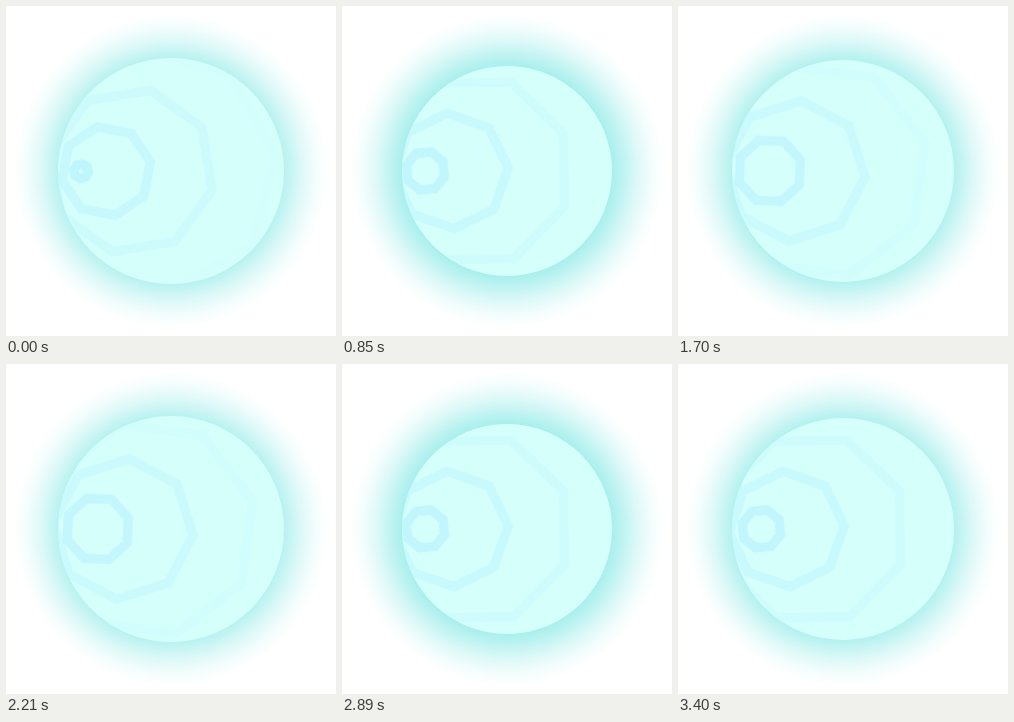
An HTML page without scripts for the animation above (3.57 s loop, 330 by 330 pixels).

```html
<!DOCTYPE html>
<html lang="en">
<head>
<meta charset="utf-8">
<title>Glowing tunnel orb</title>
<style>
  html, body { margin: 0; width: 100%; height: 100%; overflow: hidden; background: #fff; }
  svg { display: block; width: 330px; height: 330px; }
  #octagon { vector-effect: non-scaling-stroke; }

  /* --k is the depth of a ring: 0 is the far end, 9 the nearest */
  .ring {
    fill: none;
    stroke: #bff5fd;
    stroke-width: 9.5px;
    transform-box: view-box;
    transform-origin: 0 0;
    animation: recede 510ms steps(3) infinite;
  }
  .far {
    transform: translate(75px, 165.2px) rotate(8.5deg) scale(.073);
    animation: blink 510ms step-end infinite;
  }
  @keyframes recede {
    from {
      transform: translate(calc(75px + 8.4px * var(--k)), 165px)
                 rotate(calc(8.5deg + 8.3deg * var(--k)))
                 scale(calc(.073 + .126 * var(--k)));
      opacity: calc(1 - .1 * var(--k));
    }
    to {
      transform: translate(calc(75px + 8.4px * (var(--k) - 3)), 165px)
                 rotate(calc(8.5deg + 8.3deg * (var(--k) - 3)))
                 scale(calc(.073 + .126 * (var(--k) - 3)));
      opacity: calc(1 - .1 * (var(--k) - 3));
    }
  }
  @keyframes blink {
    0% { opacity: 1; }
    33.333%, 100% { opacity: 0; }
  }
</style>
</head>
<body>
<svg viewBox="0 0 330 330">
  <defs>
    <radialGradient id="glow" gradientUnits="userSpaceOnUse" cx="165" cy="165" r="157">
      <stop offset=".66" stop-color="#3ddcd6" stop-opacity=".46"/>
      <stop offset=".73" stop-color="#3ddcd6" stop-opacity=".35"/>
      <stop offset=".83" stop-color="#3ddcd6" stop-opacity=".18"/>
      <stop offset=".92" stop-color="#3ddcd6" stop-opacity=".06"/>
      <stop offset="1" stop-color="#3ddcd6" stop-opacity="0"/>
    </radialGradient>
    <clipPath id="orb">
      <circle cx="165" cy="165" r="113">
        <animate attributeName="r" dur="3570ms" repeatCount="indefinite" calcMode="discrete"
          values="113;113.4;113;111.5;108;105;104.5;105;107;109;111;113;113.4;113;110;107;105;105;106.5;109;111"/>
      </circle>
    </clipPath>
    <polygon id="octagon" points="100,0 70.71,70.71 0,100 -70.71,70.71 -100,0 -70.71,-70.71 0,-100 70.71,-70.71"/>
  </defs>
  <circle cx="165" cy="165" r="157" fill="url(#glow)"/>
  <g clip-path="url(#orb)">
    <rect width="330" height="330" fill="#d5fffb"/>
    <use class="ring" href="#octagon" style="--k:9"/>
    <use class="ring" href="#octagon" style="--k:6"/>
    <use class="ring" href="#octagon" style="--k:3"/>
    <use class="ring far" href="#octagon"/>
  </g>
</svg>
</body>
</html>
```
